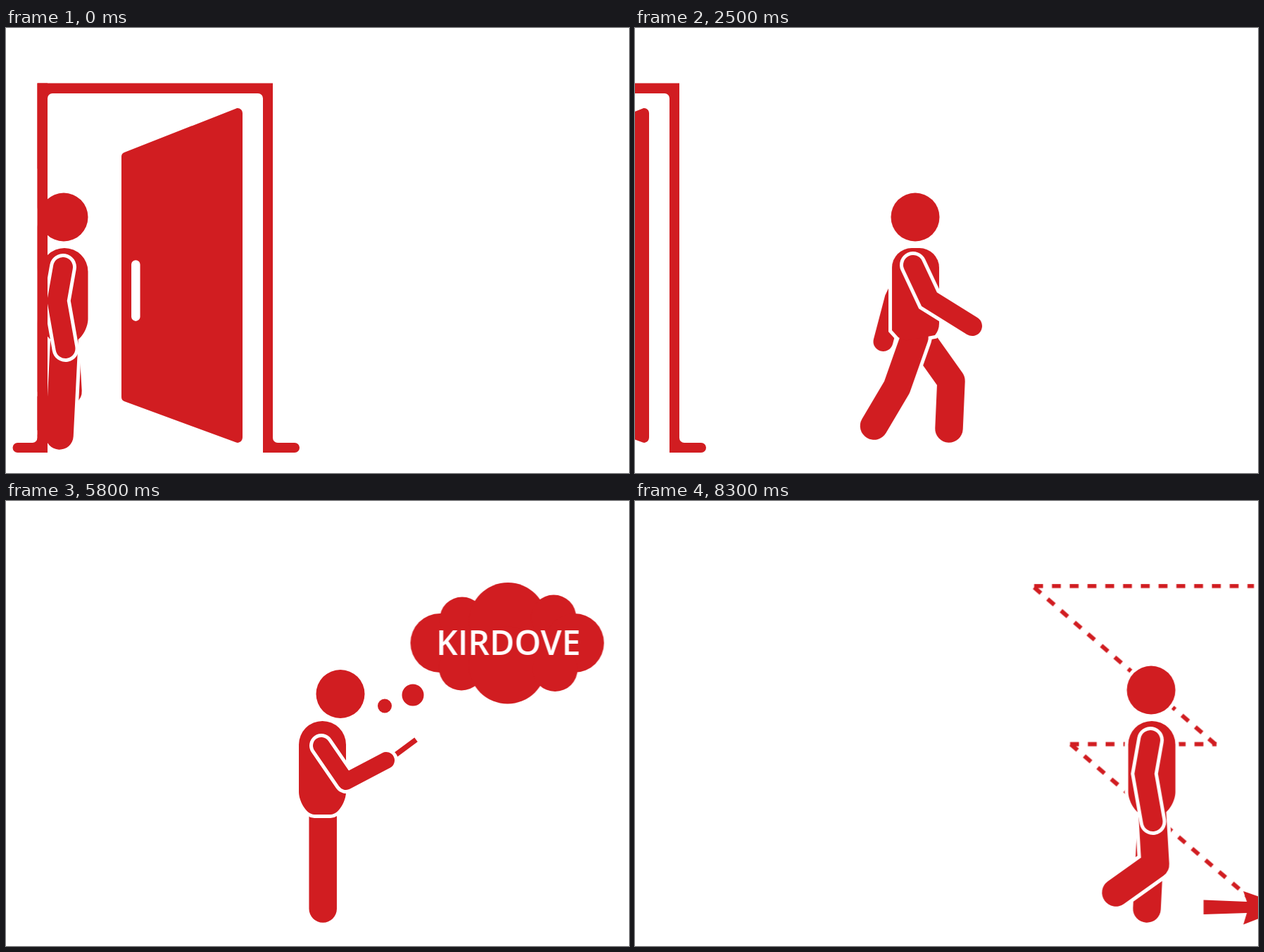
Write an HTML page without scripts that moves like this. It is 885x633 px and loops after 8400 ms.

```html
<!DOCTYPE html>
<html lang="en">
<head>
<meta charset="utf-8">
<title>Finding the way</title>
<style>
html, body { margin: 0; width: 100%; height: 100%; overflow: hidden; background: #fff; }
svg { display: block; width: 885px; height: 633px; --red: #d11d21; fill: var(--red); }

/* limbs: a white rim under a red stroke */
.leg, .arm, .thin { fill: none; stroke: var(--red); stroke-linecap: round; }
.leg { stroke-width: 39.5; stroke-linejoin: round; }
.arm { stroke-width: 28; }
.thin { stroke-width: 24; stroke-linejoin: round; }
.rim { stroke: #fff; }
.leg.rim { stroke-width: 49.5; }
.arm.rim { stroke-width: 38; }
.thin.rim { stroke-width: 34; }
.edge { stroke: #fff; stroke-width: 10; }
.dash { fill: none; stroke: var(--red); stroke-width: 6; stroke-dasharray: 12.6 12.65; }

/* travel: 12.64px every 100ms */
.go, .back { animation: go 8.4s steps(84) -.005s infinite; }
.back { animation-name: back; }
@keyframes go { to { transform: translateX(1061.8px); } }
@keyframes back { to { transform: translateX(-1061.8px); } }

/* four held poses per stride cycle */
.pose { opacity: 0; animation: pose var(--t) step-end calc(var(--t) * (var(--k) / 4 - 1 + var(--p))) infinite; }
@keyframes pose { 0% { opacity: 1; } 25%, 100% { opacity: 0; } }
.stroll { --t: calc(8.4s / 9); --p: -.01; }
.leave { --t: 1.05s; --p: .205; }

/* scenes */
.scene { animation: 8.4s step-end infinite; }
.enter { animation-name: enter; }
.wonder { animation-name: wonder; }
.read { animation-name: read; }
.exit { animation-name: exit; }
.dot1 { animation-name: dot1; }
.dot2 { animation-name: dot2; }
.cloud { animation-name: cloud; }
.shift { animation-name: shift; }
@keyframes enter { 0% { opacity: 1; } 34.5%, 100% { opacity: 0; } }
@keyframes wonder { 0% { opacity: 0; } 34.5% { opacity: 1; } 53.5%, 100% { opacity: 0; } }
@keyframes read { 0% { opacity: 0; } 53.5% { opacity: 1; } 72.5%, 100% { opacity: 0; } }
@keyframes exit { 0% { opacity: 0; } 72.5%, 100% { opacity: 1; } }
@keyframes dot1 { 0% { opacity: 0; } 41.6% { opacity: 1; } 72.5%, 100% { opacity: 0; } }
@keyframes dot2 { 0% { opacity: 0; } 46.4% { opacity: 1; } 72.5%, 100% { opacity: 0; } }
@keyframes cloud { 0% { opacity: 0; } 49.9% { opacity: 1; } 72.5%, 100% { opacity: 0; } }
@keyframes shift { 0% { transform: translate(-31.5px, -6px); } 54.7%, 100% { transform: none; } }
.drift { animation: drift 8.4s linear infinite; }
@keyframes drift { 0%, 76% { transform: none; } 100% { transform: translate(-.5px, -.4px); } }

text { font: 600 48px "Open Sans", "Noto Sans", sans-serif; }
tspan { fill: transparent; animation: ink 8.4s step-end calc(var(--n) * .1s) infinite; }
@keyframes ink { 0% { fill: transparent; } 57%, 100% { fill: #fff; } }
</style>
</head>
<body>
<svg viewBox="0 0 885 633" xmlns="http://www.w3.org/2000/svg">
<defs>
  <path id="straight" d="M1 440L-6 580"/>
  <path id="bent" d="M1.500 440L6 517L-50 557"/>
  <path id="fore" d="M0 430L51 502L48 570"/>
  <path id="hind" d="M-1 440L-26 511L-58.500 566"/>
  <path id="hang" d="M-1 340L-9.500 388L2.500 456"/>
  <path id="armBack" d="M-6 336L-29.500 385L-45.500 446"/>
  <path id="armFore" d="M-3 337L20 386L81 424"/>
  <path id="armFar" d="M0 374L81 424"/>
  <path id="trunk" d="M-32.500 346.500a33.500 33.500 0 0 1 67 0V414c0 12-10 32-22 32h-23c-12 0-22-20-22-32z"/>
  <path id="chest" d="M-33 341a28 28 0 0 1 28-28h11a28 28 0 0 1 28 28V420q0 10-6 17L-15 445L-24 440L-33 430z"/>
  <path id="readArm" d="M448 348L483 399L540 369"/>
  <path id="body" d="M412 346a36.300 35.500 0 0 1 72.600 0V420h.6V583a16.500 16.500 0 0 1-16.500 16.500h-1.500a16.500 16.500 0 0 1-16.500-16.500V450H446.500V583a16.500 16.500 0 0 1-16.500 16.500h-1.500a16.500 16.500 0 0 1-16.500-16.500z"/>
  <circle id="head" cy="269" r="34.500"/>
  <g id="face"><use href="#head" class="edge"/><use href="#head"/></g>

  <g id="passNear">
    <use href="#bent" class="leg rim"/><use href="#bent" class="leg"/>
    <use href="#trunk" class="edge"/>
    <use href="#straight" class="leg rim"/><use href="#straight" class="leg"/>
    <use href="#trunk"/>
    <use href="#hang" class="arm rim"/><use href="#hang" class="arm"/>
    <use href="#face"/>
  </g>
  <g id="passFar">
    <use href="#straight" class="leg rim"/><use href="#straight" class="leg"/>
    <use href="#trunk" class="edge"/>
    <use href="#bent" class="leg rim"/><use href="#bent" class="leg"/>
    <use href="#trunk"/>
    <use href="#hang" class="arm rim"/><use href="#hang" class="arm"/>
    <use href="#face"/>
  </g>
  <g id="strideNear">
    <use href="#armFar" class="arm rim"/><use href="#armFar" class="arm"/>
    <use href="#hind" class="leg rim"/><use href="#hind" class="leg"/>
    <use href="#chest" class="edge"/>
    <use href="#fore" class="leg rim"/><use href="#fore" class="leg"/>
    <use href="#chest"/>
    <use href="#armBack" class="arm rim"/><use href="#armBack" class="arm"/>
    <use href="#face"/>
  </g>
  <g id="strideFar">
    <use href="#armBack" class="arm rim"/><use href="#armBack" class="arm"/>
    <use href="#fore" class="leg rim"/><use href="#fore" class="leg"/>
    <use href="#chest" class="edge"/>
    <use href="#hind" class="leg rim"/><use href="#hind" class="leg"/>
    <use href="#chest"/>
    <use href="#armFore" class="arm rim"/><use href="#armFore" class="arm"/>
    <use href="#face"/>
  </g>
  <g id="walker">
    <use href="#passNear" class="pose" style="--k:0"/>
    <use href="#strideFar" class="pose" style="--k:1"/>
    <use href="#passFar" class="pose" style="--k:2"/>
    <use href="#strideNear" class="pose" style="--k:3"/>
  </g>

  <path id="frame" d="M44.500 78.500H379V583a7 7 0 0 0 7 7H410a7 7 0 0 1 0 14H365V100a7 7 0 0 0-7-7H66a7 7 0 0 0-7 7V604H16.500a7 7 0 0 1 0-14H37.500a7 7 0 0 0 7-7z"/>
  <clipPath id="leftPost"><rect y="70" width="59" height="540"/></clipPath>
</defs>

<g class="back">
  <use href="#frame"/>
  <path d="M164 183q0-4.500 4-6L327 114.500c4-1.500 9 1.500 9 7V582c0 6-5 9-9 7.500L168 531q-4-1.500-4-6z"/>
  <path d="M184.300 336.500V410.700" stroke="#fff" stroke-width="12.500" stroke-linecap="round"/>
</g>
<g class="scene enter stroll"><g class="go"><g transform="translate(82)"><use href="#walker"/></g></g></g>
<!-- the near post hides whoever is still outside -->
<g class="back">
  <rect x="-40" y="200" width="84.500" height="420" fill="#fff"/>
  <use href="#frame" clip-path="url(#leftPost)"/>
</g>

<g class="scene wonder">
  <path class="arm" d="M482 346L508 390L516.500 459"/>
  <use href="#body" class="edge"/><use href="#body"/>
  <path class="arm" stroke-linejoin="round" d="M402 247.500L360.500 298.500L425 344.500" style="stroke-width:27"/>
  <use href="#face" x="449"/>
</g>

<g class="scene read">
  <path class="leg" d="M450.200 440V580"/>
  <g transform="translate(448.500)"><use href="#trunk" class="edge"/><use href="#trunk"/></g>
  <path d="M553.500 361L582.500 339.500" stroke="#d11d21" stroke-width="7.500"/>
  <use href="#readArm" class="thin rim"/><use href="#readArm" class="thin"/>
  <use href="#face" x="475" y="5.500"/>
</g>

<g class="scene shift">
  <circle class="scene dot1" cx="538" cy="291.500" r="10"/>
  <circle class="scene dot2" cx="578" cy="276" r="15.500"/>
  <g class="scene cloud">
    <rect x="616" y="161" width="192" height="83"/>
    <circle cx="616.500" cy="202" r="42"/>
    <circle cx="648" cy="168.500" r="32"/>
    <circle cx="713" cy="171" r="55"/>
    <circle cx="778" cy="165.500" r="32"/>
    <circle cx="807.500" cy="202" r="42"/>
    <circle cx="647" cy="237.500" r="32"/>
    <circle cx="712.500" cy="233.500" r="55"/>
    <circle cx="780" cy="239" r="32"/>
    <text x="611" y="219"><tspan style="--n:0">K</tspan><tspan style="--n:1">I</tspan><tspan style="--n:2">R</tspan><tspan style="--n:3">D</tspan><tspan style="--n:4">O</tspan><tspan style="--n:5">V</tspan><tspan style="--n:6">E</tspan></text>
  </g>
</g>

<g class="scene exit leave">
  <g class="drift dash">
    <path d="M567.500 121.300H879.700"/>
    <path d="M567.500 123.300L826 347.500"/>
    <path d="M618.500 346.300H826.500"/>
    <path d="M619.500 346.500L881 571.500"/>
    <path d="M702 577H885"/>
  </g>
  <g class="go"><g transform="translate(-316)">
    <rect x="-200" y="573" width="390" height="8.500" fill="#fff"/>
    <path d="M74.500 567.500L136 570L131 555L195 577.500L131 602.500L136 586L74.500 588z"/>
    <use href="#walker"/>
  </g></g>
</g>
</svg>
</body>
</html>
```
